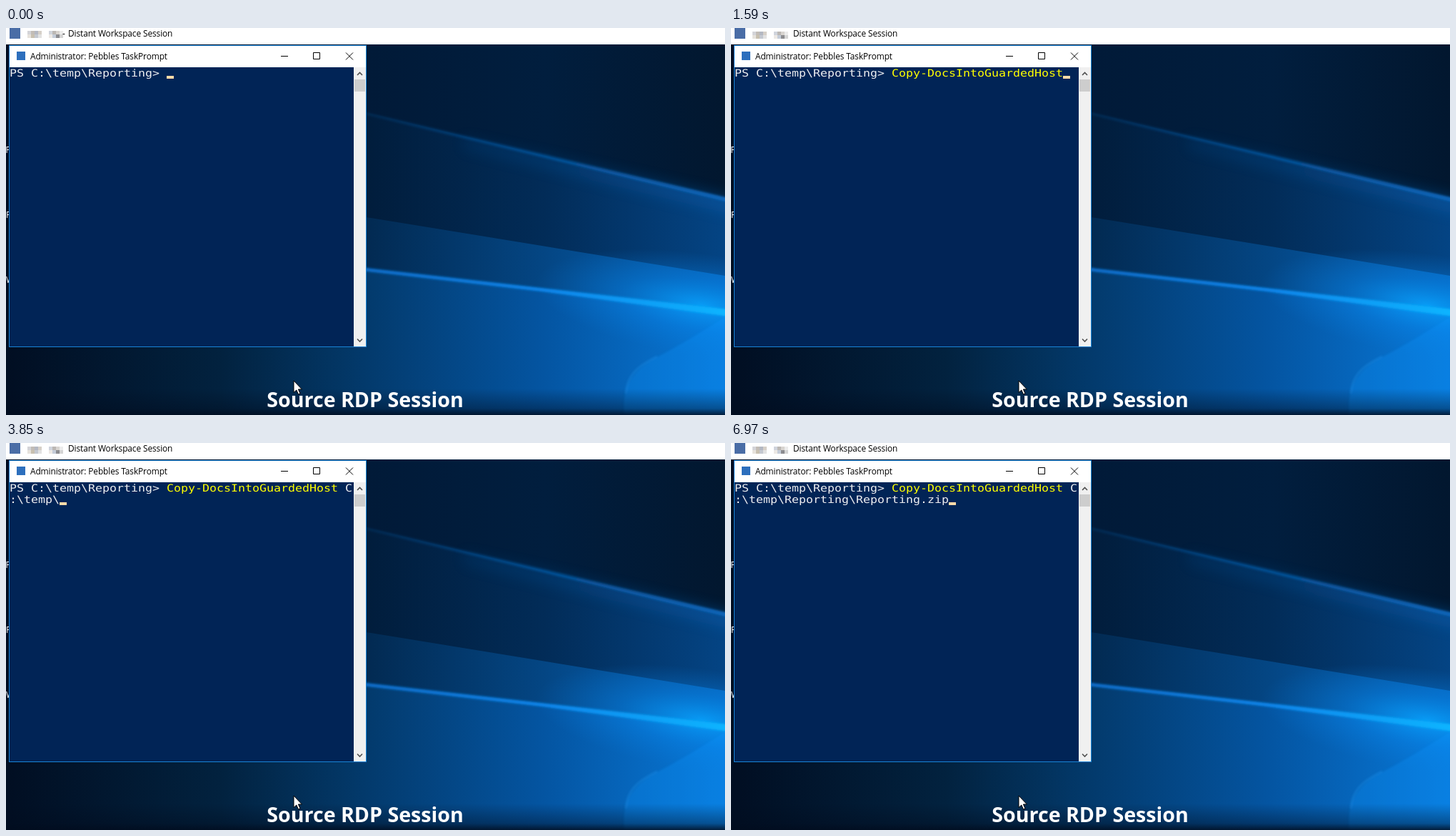
These frames come from a looping animation (1007 px wide and 542 px high, 8000 ms). An HTML page:

```html
<!DOCTYPE html>
<html lang="en">
<head>
<meta charset="utf-8">
<title>Console typing</title>
<style>
  html, body { margin: 0; width: 100%; height: 100%; overflow: hidden; background: #011730; }
  svg { display: block; width: 1007px; height: 542px; }
  .ui { font: 11.9px "Open Sans", "Noto Sans", sans-serif; letter-spacing: -.1px; }
  .mono { font: 16.61px "DejaVu Sans Mono", monospace; fill: #eeedf0; white-space: pre; text-rendering: geometricPrecision; }
  .mono .cmd { fill: #ffff00; }
  .caption { font: bold 28.6px "Open Sans", "Noto Sans", sans-serif; fill: #fff; text-anchor: middle; }
</style>
</head>
<body>
<svg viewBox="0 0 1007 542">
  <defs>
    <linearGradient id="base">
      <stop offset="0" stop-color="#010d22"/>
      <stop offset=".5" stop-color="#011a38"/>
      <stop offset=".75" stop-color="#011e3e"/>
      <stop offset="1" stop-color="#02172f"/>
    </linearGradient>
    <linearGradient id="upper" gradientUnits="userSpaceOnUse" x1="505" y1="0" x2="1007" y2="0">
      <stop offset="0" stop-color="#011d3c"/>
      <stop offset=".5" stop-color="#022c58"/>
      <stop offset="1" stop-color="#044484"/>
    </linearGradient>
    <linearGradient id="middle" gradientUnits="userSpaceOnUse" x1="505" y1="0" x2="1007" y2="0">
      <stop offset="0" stop-color="#022a52"/>
      <stop offset=".5" stop-color="#044684"/>
      <stop offset="1" stop-color="#0668c0"/>
    </linearGradient>
    <linearGradient id="lower" gradientUnits="userSpaceOnUse" x1="0" y1="0" x2="1007" y2="0">
      <stop offset="0" stop-color="#010e22"/>
      <stop offset=".3" stop-color="#02223f"/>
      <stop offset=".5" stop-color="#033a6c"/>
      <stop offset=".75" stop-color="#0455a2"/>
      <stop offset="1" stop-color="#0878d8"/>
    </linearGradient>
    <linearGradient id="faintBeam" gradientUnits="userSpaceOnUse" x1="505" y1="0" x2="1007" y2="0">
      <stop offset="0" stop-color="#0a5cab" stop-opacity=".15"/>
      <stop offset="1" stop-color="#0a66ba"/>
    </linearGradient>
    <linearGradient id="brightBeam" gradientUnits="userSpaceOnUse" x1="505" y1="0" x2="1007" y2="0">
      <stop offset="0" stop-color="#0a6cc8"/>
      <stop offset=".5" stop-color="#0a86ec"/>
      <stop offset="1" stop-color="#08b4ff"/>
    </linearGradient>
    <radialGradient id="glow">
      <stop offset="0" stop-color="#08a4ff" stop-opacity=".85"/>
      <stop offset=".5" stop-color="#0884e8" stop-opacity=".4"/>
      <stop offset="1" stop-color="#0878d8" stop-opacity="0"/>
    </radialGradient>
    <linearGradient id="floor" x2="0" y2="1">
      <stop offset="0" stop-color="#010c1e" stop-opacity="0"/>
      <stop offset=".75" stop-color="#010c1e" stop-opacity=".4"/>
      <stop offset="1" stop-color="#010c1e" stop-opacity=".85"/>
    </linearGradient>
    <filter id="soft" x="-10%" y="-30%" width="120%" height="160%"><feGaussianBlur stdDeviation="1.6"/></filter>
    <filter id="haze" x="-20%" y="-40%" width="140%" height="180%"><feGaussianBlur stdDeviation="9"/></filter>
  </defs>

  <!-- wallpaper -->
  <rect width="1007" height="542" fill="url(#base)"/>
  <path d="M505 118L1020 244V360L505 268Z" fill="url(#upper)"/>
  <path d="M640 152L1020 238V262L640 170Z" fill="url(#faintBeam)" opacity=".35" filter="url(#haze)"/>
  <path d="M505 118L750 176L1020 240V246L750 181L505 122Z" fill="url(#faintBeam)" filter="url(#soft)"/>
  <path d="M480 261L1020 349V402L480 336Z" fill="url(#middle)"/>
  <path d="M0 276L480 335L1007 398V542H0Z" fill="url(#lower)"/>
  <ellipse cx="975" cy="388" rx="235" ry="72" fill="url(#glow)" transform="rotate(8 975 388)"/>
  <path d="M866 542C862 505 876 480 910 462C945 444 975 425 1007 405V542Z" fill="#0a96ff" opacity=".28" filter="url(#soft)"/>
  <path d="M868 512C870 482 892 470 912 460" fill="none" stroke="#2aa4ff" stroke-width="2" opacity=".35" filter="url(#soft)"/>
  <path d="M480 333L750 364L1020 395V405L750 369L480 338Z" fill="url(#brightBeam)" filter="url(#soft)"/>
  <rect y="505" width="1007" height="37" fill="url(#floor)"/>

  <!-- desktop labels, mostly hidden by the window -->
  <g class="ui" fill="#fff">
    <text x="-.5" y="175">Files</text>
    <text x="0" y="266">Folder</text>
    <text x="0" y="357">Work</text>
  </g>

  <!-- session bar -->
  <rect width="1007" height="23" fill="#fff"/>
  <rect x="5" y="0" width="15" height="15" fill="#4a6da6"/>
  <g id="mosaic"></g>
  <text id="dash" class="ui" x="79" y="12">-</text>
  <text class="ui" x="87" y="12">Distant Workspace Session</text>

  <!-- console window -->
  <rect x="4.5" y="24.5" width="500" height="422" fill="#012456" stroke="#1883d7"/>
  <rect x="5" y="25" width="499" height="30" fill="#fff"/>
  <rect x="15" y="33" width="12" height="12" fill="#2d6fbd"/>
  <text class="ui" x="34" y="44">Administrator: Pebbles TaskPrompt</text>
  <path d="M385 39.5H395M430.5 34.5H439.5V43.5H430.5ZM476 34.5L486 44.5M486 34.5L476 44.5" fill="none" stroke="#000"/>
  <rect x="487" y="55" width="17" height="391" fill="#f0f0f0"/>
  <rect x="488" y="72" width="15" height="17" fill="#cdcdcd"/>
  <path d="M492 66L495.5 62.5L499 66M492 435.5L495.5 439L499 435.5" fill="none" stroke="#505050" stroke-width="1.6"/>
  <text class="mono" transform="translate(5 68) scale(1 .86)"><tspan id="prompt"></tspan><tspan id="cmd" class="cmd"></tspan><tspan id="arg"></tspan></text>
  <text id="wrap" class="mono" transform="translate(5 84) scale(1 .86)"></text>
  <rect id="caret" width="10" height="4" fill="#fedba9"/>

  <text class="caption" x="503" y="531">Source RDP Session</text>
  <path d="M403 494V510.5L406.8 507L409.5 513L412 512L409.4 506H414.4Z" fill="#fff" stroke="#000"/>
</svg>
<script>
const LOOP = 8000, COLS = 48, CELL = 10, ROW = 16;
const PROMPT = "PS C:\\temp\\Reporting> ";
const NAME = "Copy-DocsIntoGuardedHost";
const DIR = ":\\temp\\Reporting\\";
const $ = id => document.getElementById(id);

// time, command, argument
const steps = [[0, "", ""]];
const typeOut = (times, make) => times.forEach((t, i) => steps.push([t, ...make(i)]));
typeOut([330, 550, 680, 810, 940], i => [NAME.slice(0, i + 1), ""]);
typeOut([1140, 1270, 1400], i => ["Copy-" + "doc".slice(0, i + 1), ""]);
typeOut([1590, 2320, 2390], i => [NAME, " C".slice(0, i)]);
typeOut([2720, 2990, 3180, 3280, 3380, 3580, 3850, 4130, 4240, 4350],
  i => [NAME, " C" + DIR.slice(0, i + 1)]);
typeOut([4470, 4580], i => [NAME, " C" + DIR.slice(0, 16 + i)]);
typeOut([6240, 6640, 6840], i => [NAME, " C" + DIR + "*.z".slice(0, i + 1)]);
steps.push([6970, NAME, " C" + DIR + "Reporting.zip"]);

// blurred-out words in the session bar
const blocks = (x, y, colors) => colors.map((c, i) =>
  `<rect x="${x + i % 4 * 5}" y="${y + (i >> 2) * 5}" width="5" height="5" fill="${c}"/>`).join("");
const tones = ["#d4d4d8", "#c2bcb6", "#b4b8c2", "#d6d0c8", "#e6e2dc", "#c8c0b0", "#c4c8d0", "#e2e2e2"];
const tones2 = ["#d0d4dc", "#bcb8b4", "#d8d4d0", "#ececec", "#ece8e4", "#c4ccd8", "#8c8c90", "#d4d4d4"];
$("mosaic").innerHTML = blocks(30, 4, tones) + blocks(60, 4, tones2);
$("prompt").textContent = PROMPT;

let shown = -1;
function draw() {
  const t = performance.now() % LOOP;
  const n = steps.findLastIndex(s => s[0] <= t);
  if (n !== shown) {
    shown = n;
    const [time, cmd, arg] = steps[n];
    const used = PROMPT.length + cmd.length;
    const end = used + arg.length;
    $("cmd").textContent = cmd;
    $("arg").textContent = arg.slice(0, COLS - used);
    $("wrap").textContent = arg.slice(COLS - used);
    $("caret").setAttribute("x", 5 + end % COLS * CELL);
    $("caret").setAttribute("y", 67 + Math.floor(end / COLS) * ROW);
    $("dash").style.display = time < 1140 ? "" : "none";
    $("mosaic").setAttribute("transform", `translate(0 ${time < 1140 ? 0 : 1})`);
  }
  requestAnimationFrame(draw);
}
draw();
</script>
</body>
</html>
```
